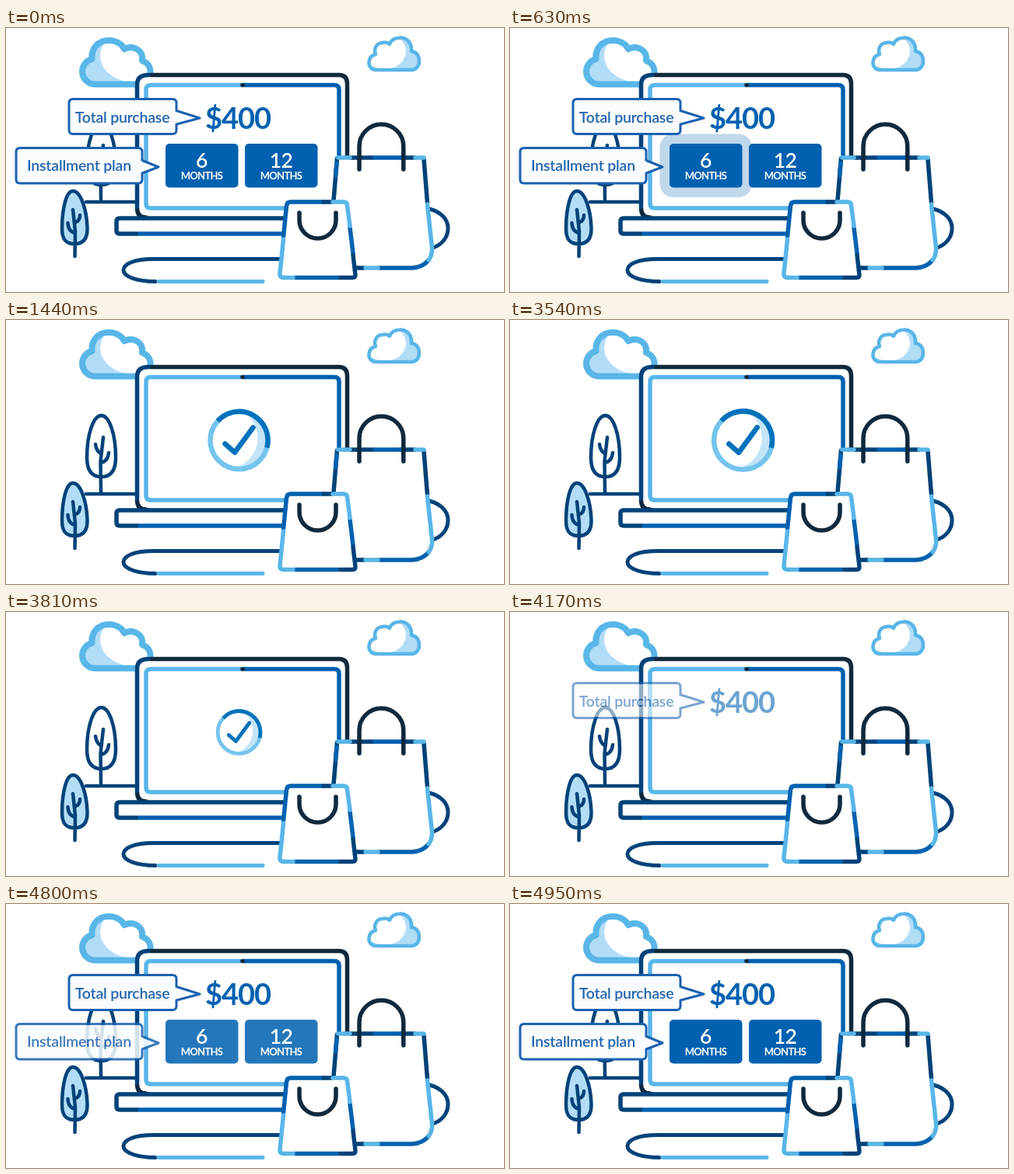
Recreate the animation shown at these times as an HTML page. Size 640 by 340 pixels, loop 5760 ms.

```html
<!DOCTYPE html>
<html lang="en">
<head>
<meta charset="utf-8">
<title>Installment plan</title>
<style>
  html, body { margin: 0; width: 100%; height: 100%; overflow: hidden; background: #fff; }
  svg { display: block; width: 640px; height: 340px; }
  .line { fill: none; stroke-width: 5.5; stroke-linecap: round; stroke-linejoin: round; }
  .navy { stroke: #10293d; }
  .dark { stroke: #00427a; }
  .blue { stroke: #0061b0; }
  .light { stroke: #59b6e8; }
  .bubble { fill: #fafdff; stroke: #1c61b0; stroke-width: 3; stroke-linejoin: round; }
  text { font-family: Lato, "Open Sans", sans-serif; text-anchor: middle; }
  .label { font-size: 19.5px; font-weight: 600; letter-spacing: -.2px; fill: #2263ae; }
  .price { font-size: 38px; font-weight: 700; letter-spacing: -1px; fill: #0061b0; }
  .count { font-size: 26.5px; font-weight: 600; letter-spacing: -.5px; fill: #fff; }
  .unit { font-size: 13px; font-weight: 700; letter-spacing: -.7px; fill: #fff; }
</style>
</head>
<body>
<svg viewBox="0 0 640 340">
  <defs>
    <path id="cloudA" d="M114 72.500A16.500 16.500 0 0 1 110.500 40C109 26 119 16 132 16C142 16 149 21 152 27C165 21 177 30 175 42C183 45 187 52 185 60C183 68 178 72.500 171 72.500Z"/>
    <path id="cloudB" d="M476 54C469 54 466 49 466.500 44C467 38 470 35 475 34C472 26 477 19 484 19C488 18 491 19 493 21C495 15 501 12.500 507 12.500C516 12.500 522 20 521 30C528 31 531 36 531 43C531 49 527 54 521 54Z"/>
    <clipPath id="clipA"><use href="#cloudA"/></clipPath>
    <clipPath id="clipB"><use href="#cloudB"/></clipPath>
    <clipPath id="clipTick"><circle r="37"/></clipPath>
  </defs>

  <!-- clouds -->
  <use href="#cloudA" fill="#b2ddf7"/>
  <ellipse cx="165" cy="36" rx="44" ry="34" fill="#fff" clip-path="url(#clipA)"/>
  <use href="#cloudA" class="line light" style="stroke-width:8"/>
  <use href="#cloudB" fill="#b2ddf7"/>
  <ellipse cx="487" cy="30" rx="27" ry="23" fill="#fff" clip-path="url(#clipB)"/>
  <use href="#cloudB" class="line light" style="stroke-width:4.500"/>

  <!-- trees and ground -->
  <g class="line dark" style="stroke-width:4.500">
    <path d="M103 224H168"/>
    <path fill="#fff" d="M122.500 123C133 123 141 148 141 177C141 194 135 202 122.500 202C110 202 104 194 104 177C104 148 112 123 122.500 123Z"/>
    <path d="M125 151L121.500 182L122 222M115 160Q116 169 122 172M132 171Q131 182 122 184"/>
    <path fill="#b2ddf7" d="M86 210C96 210 104 234 104.500 259C104.500 272 99 278 88 278C77 278 72 272 72 259C72 234 77 210 86 210Z"/>
    <path d="M86 234L89 262L88.500 294M79.500 251Q80 262 88.500 264M95 241Q95 249 88 251"/>
  </g>
  <g class="line" style="stroke-width:5">
    <path class="dark" d="M352 297.500H190C164 297.500 151 304 151 312C151 320 168 326.500 192 326.500"/>
    <path class="light" d="M196 326.500H330"/>
    <path class="dark" d="M544 233C559 237 568 246 568 258C568 270 560 279 549 283"/>
  </g>

  <!-- laptop -->
  <rect x="168.500" y="60.500" width="270" height="184" rx="12" fill="#fff"/>
  <rect x="142" y="245" width="230" height="20" rx="4" fill="#fff"/>
  <g class="line">
    <path class="navy" d="M168.500 232Q168.500 244 180 244M186 60.500H428Q438.500 60.500 438.500 72V235"/>
    <path class="dark" d="M168.500 230V73Q168.500 60.500 183 60.500"/>
    <path class="light" d="M302 73.500H186Q180 73.500 180 79.500V226Q180 232 186 232H400"/>
    <path class="blue" d="M306 73.500H422Q428 73.500 428 79.500V226"/>
    <path class="navy" d="M304 73.500h.1"/>
    <path class="dark" d="M370 245H146Q142 245 142 249V261Q142 265 146 265H170"/>
    <path class="blue" d="M172 265H370"/>
  </g>

  <!-- large bag -->
  <path fill="#fff" d="M426 167H537L547.500 283Q548 308 524 308.500H418Z"/>
  <g class="line">
    <path class="dark" d="M425.500 168L421 222M443 167H472M507 167H525M537 169L541.500 225M450 309H460"/>
    <path class="blue" d="M474 167H506M425 174L423.500 190M480 309H522Q536 308 543 299"/>
    <path class="light" d="M427 167H442M526 167H537M541.500 227L547.500 283Q548 293 543 299M462 309H478"/>
    <path class="navy" d="M454 182V152.500A28.400 28.400 0 0 1 510.800 152.500V182"/>
  </g>

  <!-- small bag -->
  <path fill="#fff" d="M362 224H437L449 321H352Z"/>
  <g class="line">
    <path class="blue" d="M356.500 269L360.500 229Q361 224 366 224H408M442 257L446 290M372 321.500H428"/>
    <path class="dark" d="M408 224H418M446 292L449 318Q449 321.500 445 321.500H430"/>
    <path class="light" d="M420 224H434Q438 224 438.500 228L442 255M356.500 272L352 316Q351.500 321 356 321.500H369"/>
    <path class="navy" d="M377 238V247.500A23.500 23.500 0 0 0 424 247.500V238"/>
  </g>

  <g id="tick">
    <circle r="37" fill="#c4e4f8"/>
    <circle cx="-16" cy="-3" r="40" fill="#fff" clip-path="url(#clipTick)"/>
    <g class="line" style="stroke-width:6.500">
      <circle r="37" stroke="#74c4ee"/>
      <path stroke="#0072bc" style="stroke-linecap:butt" d="M-27.500 -24.800A37 37 0 0 1 35.800 9.500"/>
      <path stroke="#0072bc" d="M-18 4.500L-5.500 15.500L18 -16.500"/>
    </g>
  </g>

  <g id="purchase">
    <path class="bubble" d="M86 91.500H214Q219 91.500 219 96.500V106.500L249 116L219 124V131.500Q219 136.500 214 136.500H86Q81 136.500 81 131.500V96.500Q81 91.500 86 91.500Z"/>
    <text class="label" x="149.500" y="121.500">Total purchase</text>
    <text class="price" x="298" y="130">$400</text>
  </g>

  <g id="plan">
    <rect id="halo" fill="#0061b0"/>
    <g id="options"></g>
    <path class="bubble" d="M18 154.500H170Q175 154.500 175 159.500V170.500L196 179L175 187V195Q175 200 170 200H18Q13 200 13 195V159.500Q13 154.500 18 154.500Z"/>
    <text class="label" x="94" y="184">Installment plan</text>
  </g>
</svg>

<script>
const LOOP = 5760;
const byId = id => document.getElementById(id);
const tick = byId('tick'), purchase = byId('purchase'), plan = byId('plan'), halo = byId('halo');

byId('options').innerHTML = [[205, 6], [307, 12]].map(([x, months]) => `
  <rect x="${x}" y="149" width="93.500" height="56.500" rx="5" fill="#0061b0"/>
  <text class="count" x="${x + 46.5}" y="180">${months}</text>
  <text class="unit" x="${x + 46.5}" y="195">MONTHS</text>`).join('');

const progress = (t, from, to) => Math.min(1, Math.max(0, (t - from) / (to - from)));
const smooth = x => x * x * (3 - 2 * x);
const bezier = (a, b, u) => 3 * a * u * (1 - u) ** 2 + 3 * b * u * u * (1 - u) + u ** 3;

// Same curve as the CSS "ease" keyword
function ease(x) {
  let low = 0, high = 1;
  for (let i = 0; i < 24; i++) {
    const mid = (low + high) / 2;
    if (bezier(0.25, 0.25, mid) < x) low = mid; else high = mid;
  }
  return bezier(0.1, 1, low);
}

function tickScale(t) {
  const peak = 1.15;
  const step = (from, to) => smooth(progress(t, from, to));
  if (t < 1290) return peak * step(1095, 1290);
  if (t < 3510) return peak - (peak - 1) * step(1290, 1440);
  if (t < 3690) return 1 + (peak - 1) * step(3510, 3690);
  return peak * (1 - step(3690, 3990));
}

function drawHalo(t) {
  const p = progress(t, 400, 915);
  const spread = 18 * (1 - (1 - p) ** 2);
  const attrs = {
    x: 205 - spread, y: 149 - spread,
    width: 93.5 + 2 * spread, height: 56.5 + 2 * spread,
    rx: 5 + spread, opacity: p > 0 ? 0.45 * (1 - p) : 0
  };
  for (const name in attrs) halo.setAttribute(name, attrs[name]);
}

function render(t) {
  const leaving = 1 - ease(progress(t, 1020, 1140));
  const shown = (from, to) => t < 2000 ? leaving : ease(progress(t, from, to));
  purchase.setAttribute('opacity', shown(4072, 4372));
  plan.setAttribute('opacity', shown(4605, 4955));
  tick.setAttribute('transform', `translate(299.5 155) scale(${tickScale(t)})`);
  drawHalo(t);
}

const start = performance.now();
function frame() {
  render((performance.now() - start) % LOOP);
  requestAnimationFrame(frame);
}
frame();
</script>
</body>
</html>
```
